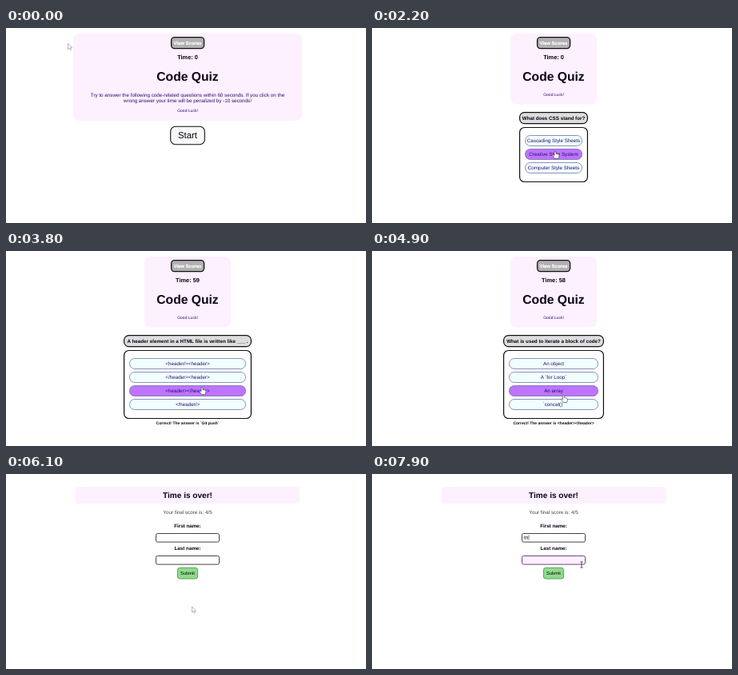
An HTML page that plays this animation: 450x244 px, repeating every 8 s.

```html
<!DOCTYPE html>
<html lang="en">
<head>
<meta charset="utf-8">
<title>Code Quiz</title>
<style>
  html, body { margin: 0; width: 100%; height: 100%; overflow: hidden; background: #fff; }
  svg { display: block; width: 450px; height: 244px; }
  text {
    font-family: "Liberation Sans", Arial, sans-serif;
    text-rendering: geometricPrecision;
    white-space: pre;
  }
</style>
</head>
<body>
<svg id="stage" viewBox="0 0 450 244"></svg>
<script>
const LOOP = 8000, STEP = 100, MID = 227, BODY = 6.26, SMALL = 5;
const INK = '#0b0216', INDIGO = '#2c0a6b', PINK = '#fdf0ff';
const stage = document.getElementById('stage');
const ruler = document.createElement('canvas').getContext('2d');
ruler.font = 'bold 100px "Liberation Sans", Arial, sans-serif';

const questions = [
  { from: 2000, ask: 'What does CSS stand for?', note: '',
    options: ['Cascading Style Sheets', 'Creative Style System', 'Computer Style Sheets'] },
  { from: 2900, ask: 'Which command do you need to execute to upload content on Tudrok?',
    note: 'Correct! The answer is Cascading Style Sheets',
    options: ['`Git pull`', '`Git push`', '`Git add -A`', '`Git commit -m`'] },
  { from: 3600, ask: 'A header element in a HTML file is written like ___ .',
    note: 'Correct! The answer is `Git push`',
    options: ['<header/><header>', '</header><header>', '<header></header>', '</header/>'] },
  { from: 4300, ask: 'What is used to iterate a block of code?',
    note: 'Correct! The answer is <header></header>',
    options: ['An object', 'A `for Loop`', 'An array', '`concat()`'] },
  { from: 5300, ask: 'In which HTML element can we put JavaScript?',
    note: 'Correct! The answer is A `for Loop`',
    options: ['<js>', '<script>', '<javascript>', '<scripting>'] }
];
const START = questions[0].from, END = 5800;

// Each question box fits its text, rounded to whole pixels
for (const q of questions)
  q.width = 2 * Math.round((ruler.measureText(q.ask).width * BODY / 100 + 8) / 2);

// Pointer stops
const path = [
  { t: 1100, x: 77.5, y: 19.5 }, { t: 1400, x: 169.5, y: 26 },
  { t: 2000, x: 227, y: 135 }, { t: 2300, x: 230, y: 164 },
  { t: 2900, x: 215, y: 139.5 }, { t: 3300, x: 215, y: 157 }, { t: 3600, x: 215, y: 157 },
  { t: 3800, x: 245, y: 170.5 }, { t: 4700, x: 245, y: 170.5 },
  { t: 4900, x: 239.5, y: 180.5 }, { t: 5300, x: 228, y: 158 },
  { t: 5800, x: 230, y: 172 }, { t: 6100, x: 232.5, y: 166 },
  { t: 6600, x: 242, y: 80 }, { t: 7200, x: 242, y: 80 },
  { t: 7700, x: 299, y: 126 }, { t: 7900, x: 262, y: 113.4 }
];

function pointerAt(t) {
  const i = Math.max(1, path.findIndex(p => p.t >= t));
  const a = path[i - 1], b = path[i];
  const k = Math.max(0, (t - a.t) / (b.t - a.t));
  return [a.x + (b.x - a.x) * k, a.y + (b.y - a.y) * k];
}

const secondsLeft = t => t < 2900 ? 0 : 60 - Math.floor((t - 2850) / 950);

const inside = ([px, py], x, y, w, h) => px >= x && px <= x + w && py >= y && py <= y + h;

const box = (x, y, w, h, r, fill, stroke = 'none', line = 0) =>
  `<rect x="${x}" y="${y}" width="${w}" height="${h}" rx="${r}" fill="${fill}" stroke="${stroke}" stroke-width="${line}"/>`;

function label(str, y, size, fill = INK, weight = 400, x = MID, anchor = 'middle') {
  const safe = str.replace(/&/g, '&amp;').replace(/</g, '&lt;');
  return `<text x="${x}" y="${y}" font-size="${size}" fill="${fill}" font-weight="${weight}" text-anchor="${anchor}">${safe}</text>`;
}

const bold = (str, y, size) => label(str, y, size, INK, 700);

function header(t, x, y, w, h) {
  return box(x, y, w, h, 8, PINK)
    + box(206.6, 11.6, 41, 14, 4, '#b1b1b1', '#111', 1.3)
    + `<g stroke="#fff" stroke-width=".2">${label('View Scores', 20.8, 5.95, '#fff', 700)}</g>`
    + bold('Time: ' + secondsLeft(t), 39.3, 7.4)
    + bold('Code Quiz', 66.1, 15.65)
    + label('Good Luck!', y + h - 10.7, SMALL, INDIGO);
}

function intro(t, pos) {
  const svg = header(t, 84, 7, 286, 109)
    + label('Try to answer the following code-related questions within 60 seconds. If you click on the', 86.2, BODY, INDIGO)
    + label('wrong answer your time will be penalized by -10 seconds!', 93.4, BODY, INDIGO)
    + box(205.7, 123.3, 42.6, 22.4, 6, '#f8f8f8', '#111', 1.1)
    + label('Start', 138.2, 11.4);
  return [svg, inside(pos, 205, 123, 43, 23) ? 'hand' : 'arrow'];
}

function quiz(t, pos) {
  const q = questions.filter(e => e.from <= t).pop();
  const left = MID - q.width / 2 + .6, w = q.width - 1.2;
  let kind = 'arrow';
  let svg = header(t, 173, 7, 108, 88.5)
    + box(left, 105.6, w, 14, 6, '#dedede', '#111', 1.2)
    + bold(q.ask, 114.9, BODY)
    + box(left, 124.5, w, 17 * q.options.length + 17, 6, '#fff', '#111', 1.2)
    + bold(q.note, 217.2, SMALL);
  q.options.forEach((name, i) => {
    const y = 134.5 + 17 * i, x = left + 6.9, ow = w - 13.8;
    const over = inside(pos, x, y, ow, 13);
    if (over) kind = 'hand';
    svg += box(x, y, ow, 13, 6.3, over ? '#be74ff' : '#f0ffff', '#62629c', .7)
      + label(name, y + 8.7, BODY, INDIGO);
  });
  return [svg, kind];
}

function result(t, pos) {
  let kind = 'arrow';
  const field = (name, y) => {
    const over = inside(pos, 187, y, 80, 12);
    if (over) kind = 'beam';
    return bold(name, y - 6.6, BODY)
      + box(187.5, y + .5, 79, 10.6, 2, over ? PINK : '#fff', over ? '#6a4a80' : '#444', 1);
  };
  let svg = box(87, 16, 280, 21, 4, PINK)
    + bold('Time is over!', 30.1, 10.05)
    + label('Your final score is: 4/5', 49.5, BODY, '#444')
    + field('First name:', 74) + field('Last name:', 102)
    + box(214.4, 117.3, 25.2, 13.8, 3, '#8edc8a', '#4a8a4a', .8)
    + label('Submit', 126, 5.75);
  if (t >= 6700) {
    const n = Math.max(0, Math.min(4, (t - 6800) / STEP));
    svg += label('f'.repeat(n), 81.6, 6, '#444', 400, 189.2, 'start')
      + `<path d="M${189.4 + n * 1.67} 76.4v6.4" stroke="#444" stroke-width=".6"/>`;
  }
  return [svg, kind];
}

const cursors = {
  arrow: '<path d="M0 0V7.2L1.7 5.7L2.9 8.2L4 7.7L2.9 5.3H5.2Z" fill="#fff" stroke="#888" stroke-width=".6"/>',
  hand: '<path d="M-1 .5Q0-.6 1 .5V3L4 3.6Q5.2 4 5 5.3L4.2 9H-.6L-3.3 5.3Q-3.2 4-1.9 4.5L-1 5.4Z" fill="#fff" stroke="#333" stroke-width=".6"/>',
  beam: '<path d="M-1.6-3.4H1.6M0-3.4V3.6M-1.6 3.6H1.6" fill="none" stroke="#333" stroke-width=".8"/>'
};

function draw(t) {
  const pos = pointerAt(t);
  const page = t < START ? intro : t < END ? quiz : result;
  const [svg, kind] = page(t, pos);
  stage.innerHTML = svg + `<g transform="translate(${pos})">${cursors[kind]}</g>`;
}

let shown = -1;
function tick() {
  const t = Math.floor(performance.now() % LOOP / STEP) * STEP;
  if (t !== shown) draw(shown = t);
  requestAnimationFrame(tick);
}
tick();
</script>
</body>
</html>
```
